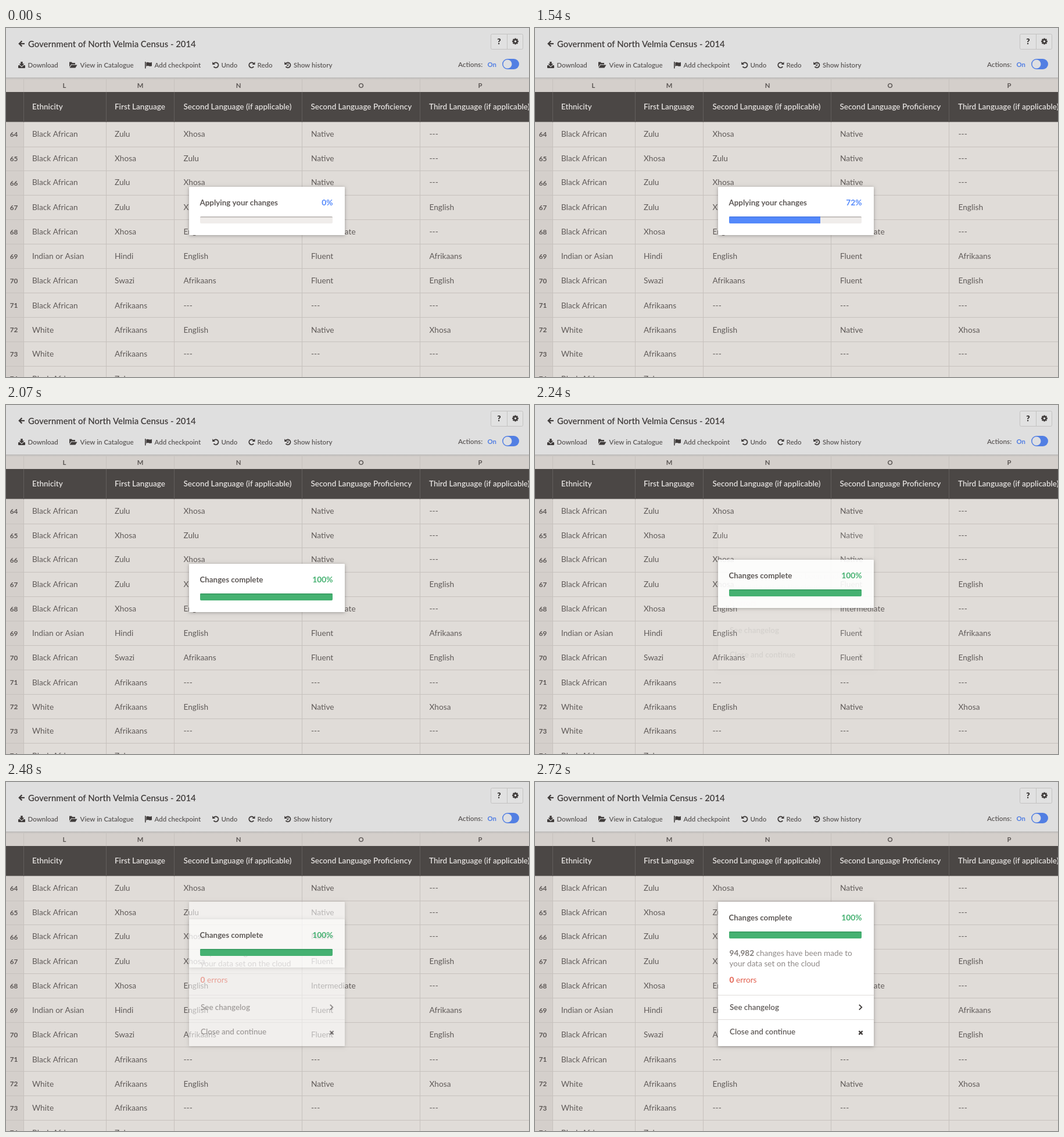
An HTML page with a canvas that plays this animation: 900 px wide and 600 px high, repeating every 4720 ms.

```html
<!DOCTYPE html>
<html lang="en">
<head>
<meta charset="utf-8">
<title>Applying changes</title>
<style>
  html, body { margin: 0; width: 100%; height: 100%; overflow: hidden; background: #dfdfdf; }
  canvas { display: block; }
</style>
</head>
<body>
<canvas id="stage" width="900" height="600"></canvas>
<script>
const ctx = document.getElementById('stage').getContext('2d');
const LOOP = 4720, STEP = 60;
const INK = '#403c3b', BODY_INK = '#5f5a58', LINE = '#c6c1bd', BAR_BG = '#dfdfdf';
const BLUE = '#5489fb', GREEN = '#45b171';

const COLUMNS = [
  { x: 30, textX: 45, letter: 'L', letterX: 100.5, title: 'Ethnicity', titleX: 45 },
  { x: 172, textX: 187, letter: 'M', letterX: 231, title: 'First Language', titleX: 187 },
  { x: 289, textX: 305.5, letter: 'N', letterX: 400, title: 'Second Language (if applicable)', titleX: 305.5 },
  { x: 509, textX: 525, letter: 'O', letterX: 611, title: 'Second Language Proficiency', titleX: 524.5 },
  { x: 712, textX: 728.5, letter: 'P', letterX: 816, title: 'Third Language (if applicable)', titleX: 728 }
];
const ROWS = [
  'Black African|Zulu|Xhosa|Native|---',
  'Black African|Xhosa|Zulu|Native|---',
  'Black African|Zulu|Xhosa|Native|---',
  'Black African|Zulu|Xhosa|Fluent|English',
  'Black African|Xhosa|English|Intermediate|---',
  'Indian or Asian|Hindi|English|Fluent|Afrikaans',
  'Black African|Swazi|Afrikaans|Fluent|English',
  'Black African|Afrikaans|---|---|---',
  'White|Afrikaans|English|Native|Xhosa',
  'White|Afrikaans|---|---|---',
  'Black African|Zulu|---|---|---'
].map(row => row.split('|'));
const BASELINES = [187, 229, 270, 313, 355, 397, 439, 482, 524, 565, 608];

const clamp = (v, lo, hi) => Math.min(hi, Math.max(lo, v));

function rect(x, y, w, h, color) {
  ctx.fillStyle = color;
  ctx.fillRect(x, y, w, h);
}

function rounded(x, y, w, h, r) {
  ctx.beginPath();
  ctx.roundRect(x, y, w, h, r);
}

function text(str, x, y, size, weight, color, align = 'left') {
  ctx.font = `${weight} ${size}px Lato, "Noto Sans", sans-serif`;
  ctx.textAlign = align;
  ctx.fillStyle = color;
  ctx.fillText(str, x, y);
}

function poly(points, color) {
  ctx.beginPath();
  points.forEach(([x, y]) => ctx.lineTo(x, y));
  ctx.closePath();
  ctx.fillStyle = color;
  ctx.fill();
}

function stroke(points, width, color) {
  ctx.beginPath();
  points.forEach(([x, y]) => ctx.lineTo(x, y));
  ctx.lineWidth = width;
  ctx.strokeStyle = color;
  ctx.stroke();
}

function disc(x, y, r, color) {
  ctx.beginPath();
  ctx.arc(x, y, r, 0, Math.PI * 2);
  ctx.fillStyle = color;
  ctx.fill();
}

function turnArrow(x, y, flip = 1) {
  ctx.save();
  ctx.translate(x, y);
  ctx.scale(flip, 1);
  ctx.beginPath();
  ctx.arc(0, 0, 4.4, -2.5, 2.5);
  ctx.lineWidth = 1.9;
  ctx.strokeStyle = INK;
  ctx.stroke();
  poly([[-5.8, -5.6], [-5.8, -0.7], [-0.9, -0.7]], INK);
  ctx.restore();
}

function gear(x, y) {
  for (let i = 0; i < 4; i++) {
    const a = i * Math.PI / 4, dx = Math.cos(a) * 5.4, dy = Math.sin(a) * 5.4;
    stroke([[x - dx, y - dy], [x + dx, y + dy]], 2.5, INK);
  }
  disc(x, y, 4.2, INK);
  disc(x, y, 1.8, BAR_BG);
}

function drawIcons() {
  stroke([[27.4, 22.4], [22.8, 27], [27.4, 31.6]], 2.2, INK);
  stroke([[23, 27], [32, 27]], 2.2, INK);

  rounded(21, 64, 12, 5, 1);
  ctx.fillStyle = INK;
  ctx.fill();
  poly([[21.7, 62], [32.3, 62], [27, 67.5]], BAR_BG);
  poly([[25.3, 58], [28.7, 58], [28.7, 61.5], [31.5, 61.5], [27, 66], [22.5, 61.5], [25.3, 61.5]], INK);

  poly([[109, 67], [109, 58.5], [113, 58.5], [114, 60], [119, 60], [119, 62.5], [112, 62.5]], INK);
  poly([[112.6, 63.4], [122.5, 63.4], [119.4, 68.6], [109.5, 68.6]], INK);

  rect(239, 58, 1.6, 11.5, INK);
  ctx.beginPath();
  ctx.moveTo(241.3, 59.5);
  ctx.bezierCurveTo(245, 57, 246.5, 61, 251, 58.8);
  ctx.lineTo(251, 65.2);
  ctx.bezierCurveTo(246.5, 67.3, 245, 63.5, 241.3, 66);
  ctx.fillStyle = INK;
  ctx.fill();

  turnArrow(361, 63.8);
  turnArrow(422.7, 63.8, -1);
  turnArrow(485, 63.8);
  stroke([[485.4, 61], [485.4, 64.6], [483, 64.6]], 1.2, INK);
}

function drawToolbar() {
  rect(0, 0, 900, 86, BAR_BG);
  text('Government of North Velmia Census - 2014', 38, 33, 14.9, 600, INK);
  [['Download', 37.5], ['View in Catalogue', 127.5], ['Add checkpoint', 255.5],
   ['Undo', 370.5], ['Redo', 432.5], ['Show history', 495]]
    .forEach(([label, x]) => text(label, x, 68, 11.5, 600, '#5b5756'));
  drawIcons();

  rounded(834.5, 10.5, 55, 26, 2);
  ctx.fillStyle = '#e1e1e1';
  ctx.fill();
  ctx.lineWidth = 1;
  ctx.strokeStyle = '#c3c2c1';
  ctx.stroke();
  rect(862, 11, 1, 25, '#c3c2c1');
  text('?', 848.5, 28, 13.5, 900, '#2f2c2b', 'center');
  gear(876.5, 23);

  text('Actions:', 778, 67, 11.7, 600, '#5b5756');
  text('On', 828.5, 67, 11.3, 700, '#527fe3');
  rounded(854, 53, 29, 18, 9);
  ctx.fillStyle = '#527fe3';
  ctx.fill();
  disc(863, 62, 7.5, '#dedfe2');
}

function drawTable() {
  rect(0, 86, 900, 24, '#d4cfcb');
  const shade = ctx.createLinearGradient(0, 84.5, 0, 89);
  shade.addColorStop(0, '#b6b5b4');
  shade.addColorStop(1, '#d4cfcb');
  rect(0, 85, 900, 4, shade);
  rect(0, 110, 900, 490, '#e0dcd8');
  rect(0, 162, 30, 438, '#d4cfcb');
  rect(0, 110, 900, 51.5, '#4b4745');

  COLUMNS.forEach(col => {
    rect(col.x, 88, 1, 512, LINE);
    rect(col.x, 110, 1, 52, '#625e5c');
    text(col.letter, col.letterX, 103, 11.3, 700, '#5b5654', 'center');
    text(col.title, col.titleX, 140, 13.5, 600, '#e4e1df');
  });

  ROWS.forEach((cells, i) => {
    rect(0, Math.floor(204 + 41.9 * i), 900, 1, LINE);
    text(64 + i, 13.5, 187 + 42 * i, 11.8, 700, '#5b5654', 'center');
    cells.forEach((cell, c) => text(cell, COLUMNS[c].textX, BASELINES[i], 13.7, 400, BODY_INK));
  });
}

function panel(y, h, alpha) {
  if (alpha <= 0) return;
  ctx.save();
  ctx.globalAlpha = alpha;
  // The shadow stays outside the box so that it does not tint a translucent panel.
  ctx.beginPath();
  ctx.rect(0, 0, 900, 600);
  ctx.rect(315, y, 268, h);
  ctx.clip('evenodd');
  ctx.shadowColor = 'rgba(0,0,0,.3)';
  ctx.shadowBlur = 6;
  ctx.shadowOffsetY = 1;
  rect(315, y, 268, h, '#fff');
  ctx.restore();
  ctx.save();
  ctx.globalAlpha = alpha;
  rounded(315, y, 268, h, 1.5);
  ctx.fillStyle = '#fff';
  ctx.fill();
  ctx.restore();
}

function drawSummary(alpha) {
  panel(206, 248, alpha);
  ctx.save();
  ctx.globalAlpha = alpha;
  const grey = '#8e8987', red = '#e2604f';
  text('94,982', 334.5, 299, 13.6, 700, '#817c7a');
  const numberWidth = ctx.measureText('94,982 ').width;
  text('changes have been made to', 334.5 + numberWidth, 299, 13.6, 400, grey);
  text('your data set on the cloud', 334.5, 317, 13.6, 400, grey);
  text('0', 334.5, 345, 13.7, 700, red);
  text('errors', 346, 345, 13.7, 400, red);
  rect(315, 366, 268, 1, '#dfdcda');
  rect(315, 408, 268, 1, '#dfdcda');
  text('See changelog', 335, 392, 13.4, 600, '#5f5a58');
  text('Close and continue', 335, 434, 13.4, 600, '#5f5a58');
  stroke([[557.8, 382.8], [562.2, 387.2], [557.8, 391.6]], 1.9, INK);
  stroke([[557.4, 428], [563.6, 434.2]], 2.4, INK);
  stroke([[563.6, 428], [557.4, 434.2]], 2.4, INK);
  ctx.restore();
}

function drawProgress(y, share, percent, done) {
  const color = done ? GREEN : BLUE;
  text(done ? 'Changes complete' : 'Applying your changes', 333.5, y + 32, 13.35, 700, '#5f5a58');
  text(percent + '%', 562.5, y + 32, 13.8, 700, color, 'right');
  ctx.save();
  rounded(334, y + 51, 228, 12, 2);
  ctx.clip();
  rect(334, y + 51, 228, 12, '#f0edeb');
  rect(334, y + 51, 228, 1, '#b9b5b3');
  rect(334, y + 52, 228, 1, '#cbc7c5');
  rect(334, y + 51, 228 * share, 12, color);
  rect(334, y + 51, 228 * share, 1.6, done ? '#389a60' : '#4b7be6');
  ctx.restore();
}

// Speeds up to the middle step, then slows to a halt.
function barShare(n) {
  return n < 8.5
    ? 0.035 + 0.0453 * n + 0.00305 * n * n
    : 0.982 - 0.337 * ((16 - n) / 7.5) ** 2;
}

function draw(t) {
  drawToolbar();
  drawTable();

  const done = t >= 2070;
  let share = 0, percent = 0;
  if (done) {
    share = 1;
    percent = 100;
  } else if (t >= 1000) {
    const n = clamp(Math.floor((t - 1000) / STEP), 0, 16);
    share = barShare(n);
    percent = Math.round(100 * ((share - 0.035) / 0.947 + 0.032 * Math.sin(Math.PI * n / 16)));
  }

  const reveal = clamp(Math.floor((t - 2240) / STEP) + 1, 0, 9) / 9;
  const y = Math.round(273 - 67 * reveal);
  if (reveal > 0) drawSummary(reveal);
  panel(y, 83, 1 - reveal);
  drawProgress(y, share, percent, done);
}

function tick() {
  draw(performance.now() % LOOP);
  requestAnimationFrame(tick);
}
tick();
</script>
</body>
</html>
```
